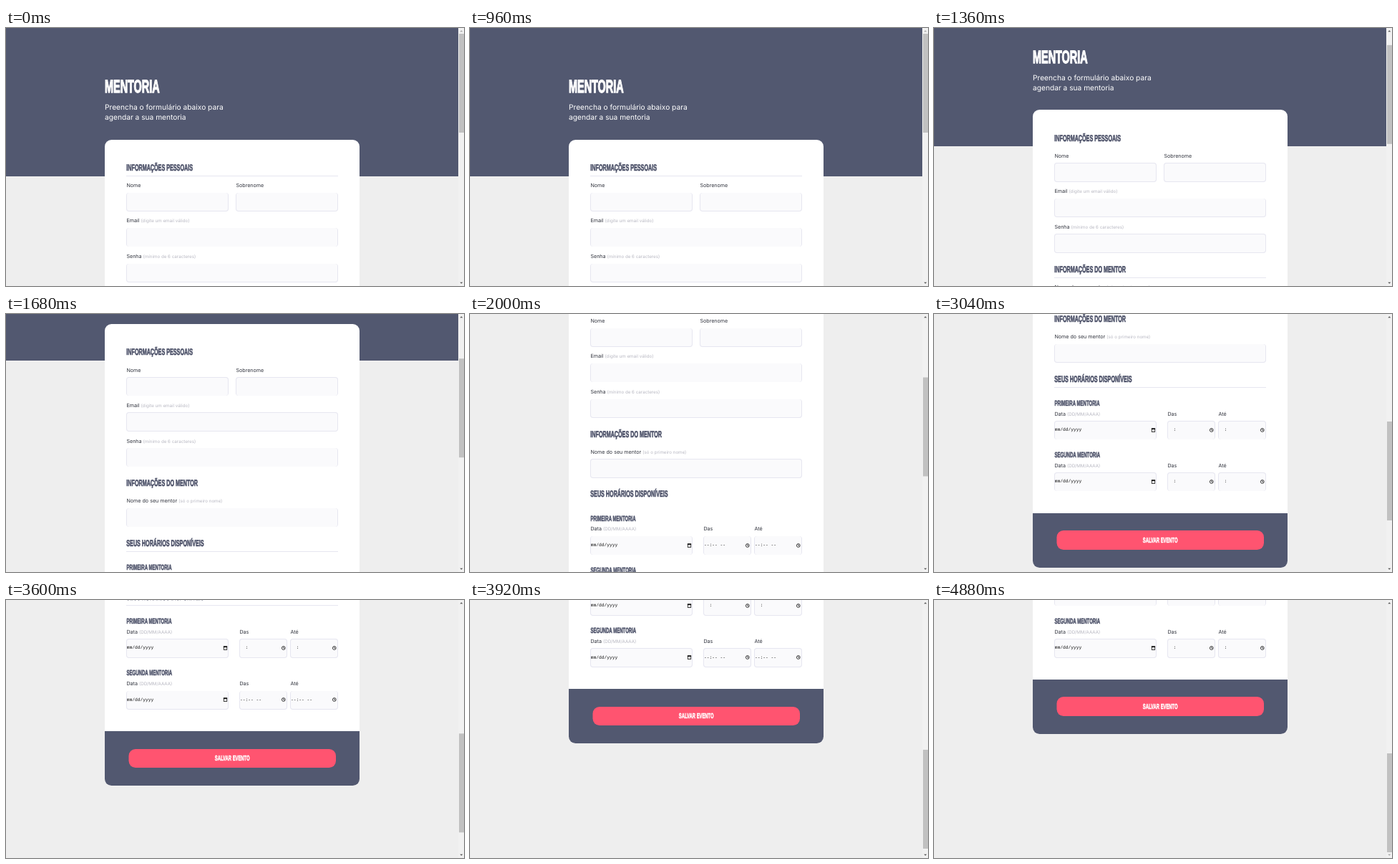
These frames come from a looping animation (640x360 px, 5.04 s). An HTML page:

```html
<!DOCTYPE html>
<html lang="pt-BR">
<head>
<meta charset="utf-8">
<title>Mentoria</title>
<style>
  html, body { margin: 0; width: 100%; height: 100%; overflow: hidden; background: #eee; }
  svg { display: block; width: 640px; height: 360px; }
  text { text-rendering: geometricPrecision; white-space: pre; }
  .body { font-family: Inter, "Open Sans", sans-serif; }
  .intro { font-size: 10.2px; fill: #fff; }
  .label { font-size: 7.15px; fill: #30333d; }
  .hint { font-size: 6.22px; fill: #b8b8c2; }
  .display { font-family: "Liberation Sans", Arial, sans-serif; font-weight: 700;
             fill: #4c5168; stroke: #4c5168; stroke-width: .055em; }
  .display.light { fill: #fff; stroke: #fff; }
  .mono { font-family: "Liberation Mono", "Courier New", monospace; font-size: 6.25px; fill: #111; }
  .icon { fill: none; stroke: #111; stroke-width: .8; }
</style>
</head>
<body>
<svg viewBox="0 0 640 360">
  <g id="page"></g>
  <g id="bar">
    <rect x="632" width="8" height="360" fill="#f1f1f1"/>
    <rect id="thumb" x="633" width="7" height="138" fill="#c1c1c1"/>
    <path id="up" d="M634.3 5.2 L636.3 3.2 L638.3 5.2 Z"/>
    <path id="down" d="M634.3 354.8 L636.3 356.8 L638.3 354.8 Z"/>
  </g>
</svg>
<script>
const $ = id => document.getElementById(id);
const LOOP = 5040, STEP = 80;
const RATIO = 768 / 360;      // document pixels per stage pixel
const MAX = 1147;             // end of the scroll, in document pixels
const NARROW = 0.575;         // proportion of the condensed display face
const SLATE = '#525870';

// Time in ms, scroll in document pixels
const SCROLL = [
  [0, 0], [1120, 0], [1200, 12], [1680, 302], [2240, 500], [2480, 500],
  [2560, 514], [3040, 791], [3600, 993], [4080, MAX], [LOOP, MAX]
];

// Vertical places are document pixels, horizontal ones stage pixels.
const box = (x, w, top, bottom, fill, rx = 0) =>
  `<rect x="${x}" width="${w}" rx="${rx}" fill="${fill}" data-top="${top}" data-bottom="${bottom}"/>`;

const at = (y, content) => `<g data-y="${y}">${content}</g>`;

const text = (x, y, str, cls) => at(y, `<text class="${cls}" x="${x}">${str}</text>`);

const display = (x, y, size, str, cls = '', anchor = 'start') => at(y,
  `<text class="display ${cls}" transform="translate(${x} 0) scale(${NARROW} 1)"
    font-size="${size}" text-anchor="${anchor}">${str}</text>`);

const label = (x, y, str, hint = '') => text(x, y,
  str + (hint && `<tspan class="hint" dx="2">(${hint})</tspan>`), 'body label');

const field = (x, w, top) =>
  box(x, w, top, top + 56, '#e6e6f0', 3.7) +
  box(x + 1, w - 2, top + 1, top + 55, '#fafafc', 3);

const labelled = (x, w, top, str, hint) => label(x + .4, top - 16, str, hint) + field(x, w, top);

const section = (y, str) => display(168.3, y - 16, 12.5, str) + box(168, 296, y, y + 1, '#e6e6f0');

const calendar = (x, y) => at(y,
  `<rect class="icon" x="${x - 2.2}" y="-2" width="4.4" height="4.4"/>
   <rect x="${x - 2.6}" y="-2.6" width="5.2" height="1.7" fill="#111"/>`);

const clock = (x, y) => at(y,
  `<circle class="icon" cx="${x}" r="2.4"/>
   <path class="icon" d="M${x} -1.6 V0 L${x + 1.2} .8"/>`);

const timeField = (x, top, str) => labelled(x, 67, top, str) +
  at(top + 30, `<text class="mono time" x="${x + 1}" data-dash="${top + 27}"></text>`) +
  clock(x + 61.8, top + 27);

const slot = (top, title) =>
  display(168.5, top - 45, 10.5, title) +
  labelled(168, 143, top, 'Data', 'DD/MM/AAAA') +
  text(168.7, top + 30, 'mm/dd/yyyy', 'mono') + calendar(306.5, top + 27) +
  timeField(326, top, 'Das') + timeField(397, top, 'Até');

$('page').innerHTML =
  box(0, 632, 0, 441, SLATE) +
  display(138, 192, 25.1, 'MENTORIA', 'light') +
  text(138, 244, 'Preencha o formulário abaixo para', 'body intro') +
  text(138, 274, 'agendar a sua mentoria', 'body intro') +
  box(138, 356, 1300, 1546, SLATE, 9.4) +
  box(138, 356, 332, 1200, '#fff', 9.4) +
  box(138, 356, 1100, 1384, '#fff') +
  section(440, 'INFORMAÇÕES PESSOAIS') +
  labelled(168, 143, 490, 'Nome') + labelled(321, 143, 490, 'Sobrenome') +
  labelled(168, 296, 595, 'Email', 'digite um email válido') +
  labelled(168, 296, 701, 'Senha', 'mínimo de 6 caracteres') +
  section(831, 'INFORMAÇÕES DO MENTOR') +
  labelled(168, 296, 880, 'Nome do seu mentor', 'só o primeiro nome') +
  section(1009, 'SEUS HORÁRIOS DISPONÍVEIS') +
  slot(1109, 'PRIMEIRA MENTORIA') + slot(1263, 'SEGUNDA MENTORIA') +
  box(171.5, 289.5, 1436, 1492, '#ff5470', 9.4) +
  display(316.2, 1471, 10.2, 'SALVAR EVENTO', 'light', 'middle');

const boxes = [...document.querySelectorAll('[data-top]')];
const items = [...document.querySelectorAll('[data-y]')];
const times = [...document.querySelectorAll('.time')];

// Monotone cubic through the scroll table
const secant = i => (SCROLL[i + 1][1] - SCROLL[i][1]) / (SCROLL[i + 1][0] - SCROLL[i][0]);
const slopes = SCROLL.map((_, i) => {
  if (i === 0 || i === SCROLL.length - 1) return 0;
  const a = secant(i - 1), b = secant(i);
  return a * b > 0 ? 2 * a * b / (a + b) : 0;
});
function scrollAt(t) {
  let i = 0;
  while (i < SCROLL.length - 2 && t >= SCROLL[i + 1][0]) i++;
  const [t0, s0] = SCROLL[i], [t1, s1] = SCROLL[i + 1];
  const h = t1 - t0, u = (t - t0) / h, v = 1 - u;
  return Math.round(s0 * (1 + 2 * u) * v * v + s1 * u * u * (3 - 2 * u)
    + h * u * v * (slopes[i] * v - slopes[i + 1] * u));
}

// First stage row at or below a document edge; thin lines may fall between rows
function row(y) {
  const r = Math.ceil(y / RATIO - .5);
  return Math.floor((r - .5) * RATIO) >= y ? r - 1 : r;
}

function draw(t) {
  const s = scrollAt(Math.floor(t / STEP) * STEP);
  for (const el of boxes) {
    const top = row(el.dataset.top - s), bottom = row(el.dataset.bottom - s);
    el.setAttribute('y', top);
    el.setAttribute('height', bottom - top);
  }
  for (const el of items) {
    el.setAttribute('transform', `translate(0 ${Math.round((el.dataset.y - s) / RATIO)})`);
  }
  for (const el of times) {
    const y = el.dataset.dash - s;
    const str = row(y) < row(y + 1) ? '--:-- --' : '  :';
    if (el.textContent !== str) el.textContent = str;
  }
  $('thumb').setAttribute('y', (8 + 206 * s / MAX).toFixed(2));
  $('up').setAttribute('fill', s > 0 ? '#505050' : '#a3a3a3');
  $('down').setAttribute('fill', s < MAX ? '#505050' : '#a3a3a3');
}

const start = performance.now();
function tick() {
  draw((performance.now() - start) % LOOP);
  requestAnimationFrame(tick);
}
tick();
</script>
</body>
</html>
```
